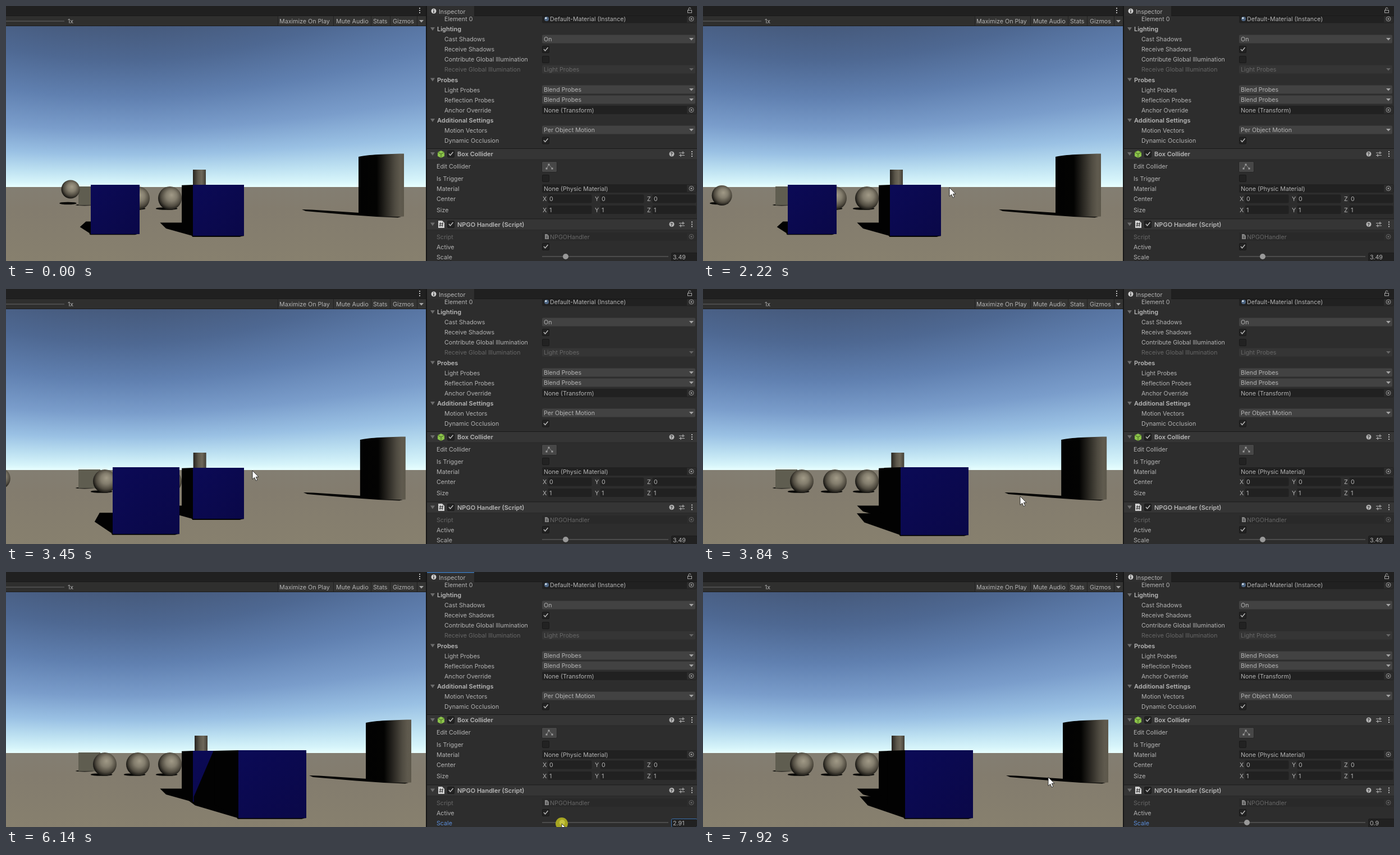
Write an HTML page with a canvas that moves like this. It is 1231x455 px and loops after 8 s.

```html
<!DOCTYPE html>
<html lang="en">
<head>
<meta charset="utf-8">
<title>Game view and inspector</title>
<style>
html, body { margin: 0; width: 100%; height: 100%; overflow: hidden; background: #2d2d2d; }
canvas, svg { position: absolute; left: 0; top: 0; width: 1231px; height: 455px; }
text { font: 10.7px Inter, "Liberation Sans", sans-serif; fill: #b4b4b4; white-space: pre; }
.b { font-size: 11px; font-weight: 600; fill: #b8b8b8; }
.dim { fill: #676767; }
.focus { fill: #5b8fdc; }
</style>
</head>
<body>
<canvas id="view" width="1231" height="455"></canvas>
<svg id="ui" viewBox="0 0 1231 455"></svg>
<script>
const LOOP = 8000, STEP = 76.8;
const VX = 210, HORIZON = 323, FOCAL = 462, TOP = 0.043, BASE = 0.962;

/* ---------- interface ---------- */
const out = [];
const rect = (x, y, w, h, fill, more = '') =>
  out.push(`<rect x="${x}" y="${y}" width="${w}" height="${h}" fill="${fill}" ${more}/>`);
const path = (d, fill = 'none', stroke = 'none', more = '') =>
  out.push(`<path d="${d}" fill="${fill}" stroke="${stroke}" ${more}/>`);
const disc = (x, y, r, fill, more = '') =>
  out.push(`<circle cx="${x}" cy="${y}" r="${r}" fill="${fill}" ${more}/>`);
const text = (x, y, s, cls = '', id = '') =>
  out.push(`<text x="${x}" y="${y + 4}" class="${cls}" id="${id}">${s}</text>`);
const dots = (x, y) => [-4, 0, 4].forEach(d => rect(x - 1, y + d - 1, 2, 2, '#bbb'));
const down = (x, y, c = '#a5a5a5') => path(`M${x - 4} ${y - 2}h8l-4 4.5z`, c);
const fold = y => path(`M756 ${y - 3}h8l-4 6z`, '#6c6c6c');

function box(x, y, on) {
  rect(x + .5, y - 5.5, 12, 12, '#222', 'rx="1.5" stroke="#191919"');
  if (on) path(`M${x + 3} ${y}l2.5 3 5-6`, 'none', '#bebebe', 'stroke-width="1.4"');
}
function drop(y, s, off) {
  rect(955, y - 7.5, 273, 15, off ? '#353535' : '#424242', 'rx="2"');
  text(958, y, s, off ? 'dim' : '');
  down(1221, y, off ? '#666' : '#a5a5a5');
}
function slot(y, s, x = 958, off) {
  rect(955, y - 7.5, 275, 15, off ? '#292929' : '#212121', 'rx="2"');
  rect(1213, y - 6.5, 16, 13, '#2c2c2c');
  text(x, y, s, off ? 'dim' : '');
  const c = off ? '#666' : '#999';
  disc(1221, y, 4, 'none', `stroke="${c}"`);
  disc(1221, y, 1.5, c);
}
function group(y, s) { fold(y); text(768, y, s, 'b'); }
function header(y, s) {
  rect(750, y - 10, 481, 1, '#191919');
  rect(750, y - 9, 481, 19, '#353535');
  rect(750, y + 9.5, 481, 1, '#292929');
  fold(y);
  box(786, y - .5, true);
  text(804, y, s, 'b');
  disc(1186, y, 4.5, '#b5b5b5');
  out.push(`<text x="1183.5" y="${y + 3}" style="font-size:8px;font-weight:700;fill:#333">?</text>`);
  path(`M1199 ${y - 2}h10M1199 ${y + 2.5}h10M1206 ${y - 4.5}v5M1202 ${y}v5`, 'none', '#b5b5b5', 'stroke-width="1.2"');
  dots(1222, y);
}
function vector(y, s, v) {
  text(767, y, s);
  ['X', 'Y', 'Z'].forEach((n, i) => {
    const x = 956 + 93 * i;
    text(x, y, n);
    rect(x + 9.5, y - 7.5, 78, 15, '#212121', 'rx="2"');
    text(x + 12, y, v);
  });
}

// game toolbar
rect(0, 0, 748, 17, '#202020');
rect(0, 17, 748, 1, '#191919');
rect(0, 18, 748, 18, '#2f2f2e');
rect(0, 35, 748, 1, '#1c1c1c');
rect(484, 18, 264, 17, '#343433');
[484, 583, 650, 684, 732].forEach(x => rect(x, 18, 1, 17, '#212121'));
rect(0, 26.3, 104, 1.4, '#575757');
text(110, 27, '1x');
[[487, 'Maximize On Play'], [588, 'Mute Audio'], [654, 'Stats'], [689, 'Gizmos']]
  .forEach(([x, s]) => text(x, 27, s));
down(740, 27);
dots(737, 8);

// inspector
rect(748, 0, 483, 455, '#2d2d2d');
rect(748, 0, 2, 455, '#171717');
slot(23, 'Default-Material (Instance)', 969);
text(781, 23, 'Element 0');
disc(963, 23, 4, '#4d6583');
disc(961.8, 21.6, 1.7, '#dce6ee');
rect(750, 0, 481, 18, '#202020');
rect(750, 0, 84, 18, '#2f2f2f');
rect(834, 17, 397, 1, '#191919');
disc(762, 9, 4.5, '#d0d0d0');
path('M762 6v1.5M762 8.5v3.5', 'none', '#2a2a2a', 'stroke-width="1.5"');
text(771, 9.5, 'Inspector');
rect(1214.5, 7.5, 7, 4.5, 'none', 'stroke="#aaa"');
path('M1216 7V5a2 2 0 0 1 4 0', 'none', '#aaa');

group(41, 'Lighting');
text(781, 59, 'Cast Shadows'); drop(59, 'On');
text(781, 77, 'Receive Shadows'); box(955, 77, true);
text(781, 95, 'Contribute Global Illumination'); box(955, 95);
text(781, 113, 'Receive Global Illumination', 'dim'); drop(113, 'Light Probes', true);
group(131.5, 'Probes');
text(781, 150, 'Light Probes'); drop(149, 'Blend Probes');
text(781, 168, 'Reflection Probes'); drop(167, 'Blend Probes');
text(781, 186, 'Anchor Override'); slot(185.5, 'None (Transform)');
group(204, 'Additional Settings');
text(781, 222, 'Motion Vectors'); drop(221, 'Per Object Motion');
text(781, 240, 'Dynamic Occlusion'); box(955, 239.5, true);

header(264, 'Box Collider');
path('M775 258l6 3v7l-6 3-6-3v-7z', '#8bc34a');
path('M769 261l6 3 6-3M775 264v7', 'none', '#43621f');
text(767, 286, 'Edit Collider');
rect(954.5, 277.5, 27, 19, '#474747', 'rx="2" stroke="#252525"');
path('M963 290l4-7 6 7', 'none', '#8c8c8c');
[[963, 290], [967, 283], [973, 290]].forEach(([x, y]) => rect(x - 1.5, y - 1.5, 3, 3, '#9c9c9c'));
text(767, 308, 'Is Trigger'); box(955, 307);
text(767, 326, 'Material'); slot(325.5, 'None (Physic Material)');
vector(344, 'Center', 0);
vector(363.5, 'Size', 1);

header(389.5, 'NPGO Handler (Script)');
path('M770 383h7l4 4v9h-11z', '#d2d2d2');
path('M774 386l-1 8M778 386l-1 8M772 388.5h7M771.500 391.500h7', 'none', '#333');
text(767, 411.5, 'Script', 'dim');
slot(411.5, 'NPGOHandler', 969, true);
path('M960 407h4l3 3v6h-7z', '#858585');
path('M962 411h3M962 413.500h3', 'none', '#333');
text(767, 429.5, 'Active'); box(955, 429, true);
text(767, 448, 'Scale', '', 'label');
rect(955, 446.3, 225, 1.4, '#5a5a5a');
rect(1185.5, 440.5, 46, 15, '#212121', 'rx="2" id="field"');
text(1188, 448, '3.49', '', 'value');
rect(750, 0, 84, 1.6, '#3a72b0', 'id="line"');
disc(0, 449, 11, '#a6a522', 'id="halo"');
disc(997, 447, 5, '#999', 'id="knob"');
path('M0 0V15.500L3.700 12.300 6.200 18 8.800 16.900 6.300 11.300H11Z', '#fff', '#111', 'stroke-width=".8" id="cursor"');
document.getElementById('ui').innerHTML = out.join('');
const $ = id => document.getElementById(id);

/* ---------- scene ---------- */
const g = $('view').getContext('2d');

function ramp(make, stops) {
  stops.forEach(([p, c]) => make.addColorStop(p, c));
  return make;
}
const SKY = [[0, '#e8ffff'], [.03, '#d6f4fa'], [.1, '#bce0f1'], [.2, '#9ac1e4'], [.35, '#7a9dcb'],
  [.55, '#6080b0'], [.78, '#4e6892'], [1, '#465a7c']];
const GROUND = [[0, '#837e72'], [.3, '#837c6e'], [1, '#87806e']];

const back = document.createElement('canvas');
back.width = 748; back.height = 455;
{
  const c = back.getContext('2d');
  for (let x = 0; x < 748; x += 4) {
    const k = Math.hypot(FOCAL, x + 2 - VX) / FOCAL;
    c.fillStyle = ramp(c.createLinearGradient(0, HORIZON, 0, HORIZON - 290 * k), SKY);
    c.fillRect(x, 36, 4, HORIZON - 36);
  }
  c.fillStyle = ramp(c.createLinearGradient(0, HORIZON, 0, 455), GROUND);
  c.fillRect(0, HORIZON, 748, 132);
}

function poly(pts, fill) {
  g.beginPath();
  pts.forEach(p => g.lineTo(...p));
  g.closePath();
  g.fillStyle = fill;
  g.fill();
}
function oval(x, y, rx, ry, fill) {
  g.beginPath();
  g.ellipse(x, y, rx, ry, 0, 0, 7);
  g.fillStyle = fill;
  g.fill();
}
function ball(x, y, r, ground) {
  oval(x - .28 * r, ground, .92 * r, 2.3, '#080806');
  const s = g.createRadialGradient(x + .14 * r, y - .28 * r, 0, x + .1 * r, y - .12 * r, 1.15 * r);
  oval(x, y, r, r, ramp(s, [[0, '#a19a87'], [.4, '#837d6d'], [.74, '#504b40'], [1, '#11100d']]));
}
// x to the right, d away from the eye, h below eye level
const spot = (x, d, h) => [VX + x * FOCAL / d, HORIZON + h * FOCAL / d];

function shade({ x, d }) {
  poly([spot(x, d, BASE), spot(x - .38, d + .93, BASE), spot(x - .38, d + 1.93, BASE),
    spot(x + .62, d + 1.93, BASE), spot(x + 1, d + 1, BASE), spot(x + 1, d, BASE)], '#020202');
  const [l, y] = spot(x, d, BASE), [r] = spot(x + 1, d, BASE);
  poly([[l - 3, y - 1], [r, y - 1], [r - 8, y + 1.5], [l - 1, y + 1.5]], '#020202');
}
function cube({ x, d }) {
  const a = spot(x, d, -TOP).map(Math.round), b = spot(x + 1, d, BASE).map(Math.round);
  if (x > 0)
    poly([a, spot(x, d + 1, -TOP), spot(x, d + 1, BASE), [a[0], b[1]]], '#020202');
  g.fillStyle = ramp(g.createLinearGradient(a[0], a[1], b[0], b[1]), [[0, '#0b0a56'], [1, '#0a0848']]);
  g.fillRect(a[0], a[1], b[0] - a[0], b[1] - a[1]);
}
function pillar(dx) {
  g.save();
  g.translate(dx, 0);
  poly([[527, 363], [545, 363.500], [630, 369], [704, 376], [698, 377.500], [660, 376], [610, 372.500], [534, 366]], '#050504');
  g.beginPath();
  g.moveTo(628, 269);
  g.bezierCurveTo(640, 266, 668, 264, 709, 263.500);
  g.lineTo(709, 375.500);
  g.bezierCurveTo(690, 377, 650, 375, 628, 373);
  g.closePath();
  g.fillStyle = ramp(g.createLinearGradient(628, 0, 709, 0),
    [[0, '#020202'], [.4, '#030302'], [.58, '#25231e'], [.8, '#4f4b41'], [.92, '#5f5a4e'], [1, '#5d584b']]);
  g.fill();
  g.restore();
}
function post(dx) {
  g.fillStyle = ramp(g.createLinearGradient(333 + dx, 0, 356 + dx, 0),
    [[0, '#27241f'], [.4, '#5c574b'], [.68, '#6e685a'], [1, '#423e35']]);
  g.fillRect(333 + dx, 292, 23, 30);
}

/* ---------- motion ---------- */
function along(keys, t) {
  if (t <= keys[0][0]) return keys[0].slice(1);
  for (let i = 1; i < keys.length; i++) {
    const a = keys[i - 1], b = keys[i];
    if (t <= b[0]) {
      const p = (t - a[0]) / (b[0] - a[0]);
      return a.slice(1).map((v, j) => v + (b[j + 1] - v) * p);
    }
  }
  return keys[keys.length - 1].slice(1);
}
const CURSOR = [[0, 991, 475], [70, 991, 434], [760, 445, 352], [840, 437, 351], [1300, 437, 351],
  [1650, 439, 324], [3560, 439, 324], [4220, 736, 432], [4300, 775, 450], [4370, 800, 475],
  [4800, 980, 475], [5000, 990, 447], [5400, 997, 449], [5800, 997, 449], [6144, 990, 449],
  [6700, 969, 449], [6900, 969, 449], [7680, 672, 384], [7910, 615, 366]];
const SCALE = [[5800, 3.49], [6144, 2.91], [6700, .9]];
const SIDE = [[3310, -.678], [3450, -.186], [3986, 1.686], [7430, 1.686], [7910, 1.24]];
const DEPTH = [[3050, 5.31], [3450, 3.915], [3477, 3.82]];
const PUSH = [[3310, 0], [3986, 1]];
const FIXED = { x: 1.357, d: 5.08 };

function scene(t) {
  g.drawImage(back, 0, 0);
  const [x] = along(SIDE, t), [d] = along(DEPTH, t), [push] = along(PUSH, t);
  const mover = { x, d }, s = t / 1000;

  oval(140, 355, 16, 1.5, '#0c0b09');
  g.fillStyle = '#5f5d50';
  g.fillRect(129, 322, 39, 33.5);
  const fall = Math.min(1, t / 220) ** 2;
  if (t < 4100) ball(115 - 36.5 * s, 327 + 11 * fall, 16.5 + .7 * s, 352);
  [176, 235, 292].forEach(cx => ball(cx, 343, 21, 361.5));
  post(3 * push);
  pillar(13 * push);

  shade(FIXED);
  shade(mover);
  cube(FIXED);
  // shadow thrown on the front of the resting cube
  if (d + 1 < FIXED.d && x > 0) {
    const [fx, fy] = spot(x, d + 1, -TOP), [r] = spot(x + 1, d, 0);
    const [l, top] = spot(FIXED.x, FIXED.d, -TOP), [e, low] = spot(FIXED.x + 1, FIXED.d, BASE);
    g.save();
    g.beginPath();
    g.rect(l, top, e - l, low - top);
    g.clip();
    poly([[fx - 1, fy - 2], [fx - 37, fy + 82], [fx - 37, 455], [r, 455], [r, fy - 2]], '#020202');
    g.restore();
  }
  cube(mover);
}

function panel(t) {
  const [v] = along(SCALE, t), [cx, cy] = along(CURSOR, t);
  const held = t > 5480 && t < 6860, active = t > 5480 && t < 7400;
  $('value').textContent = String(+v.toFixed(2));
  $('knob').setAttribute('cx', 959.3 + 10.8 * v);
  $('knob').setAttribute('fill', held ? '#c5c441' : '#999');
  $('label').setAttribute('class', t > 5480 ? 'focus' : '');
  $('field').setAttribute('stroke', active ? '#3a72b0' : '#1b1b1b');
  $('line').style.display = active ? '' : 'none';
  $('halo').style.display = held ? '' : 'none';
  $('halo').setAttribute('cx', cx);
  $('cursor').setAttribute('transform', `translate(${cx} ${cy})`);
}

function frame() {
  const n = Math.min(103, Math.floor((performance.now() % LOOP + 14) / 76.9));
  scene(n * STEP);
  panel(n * STEP);
  requestAnimationFrame(frame);
}
frame();
</script>
</body>
</html>
```
